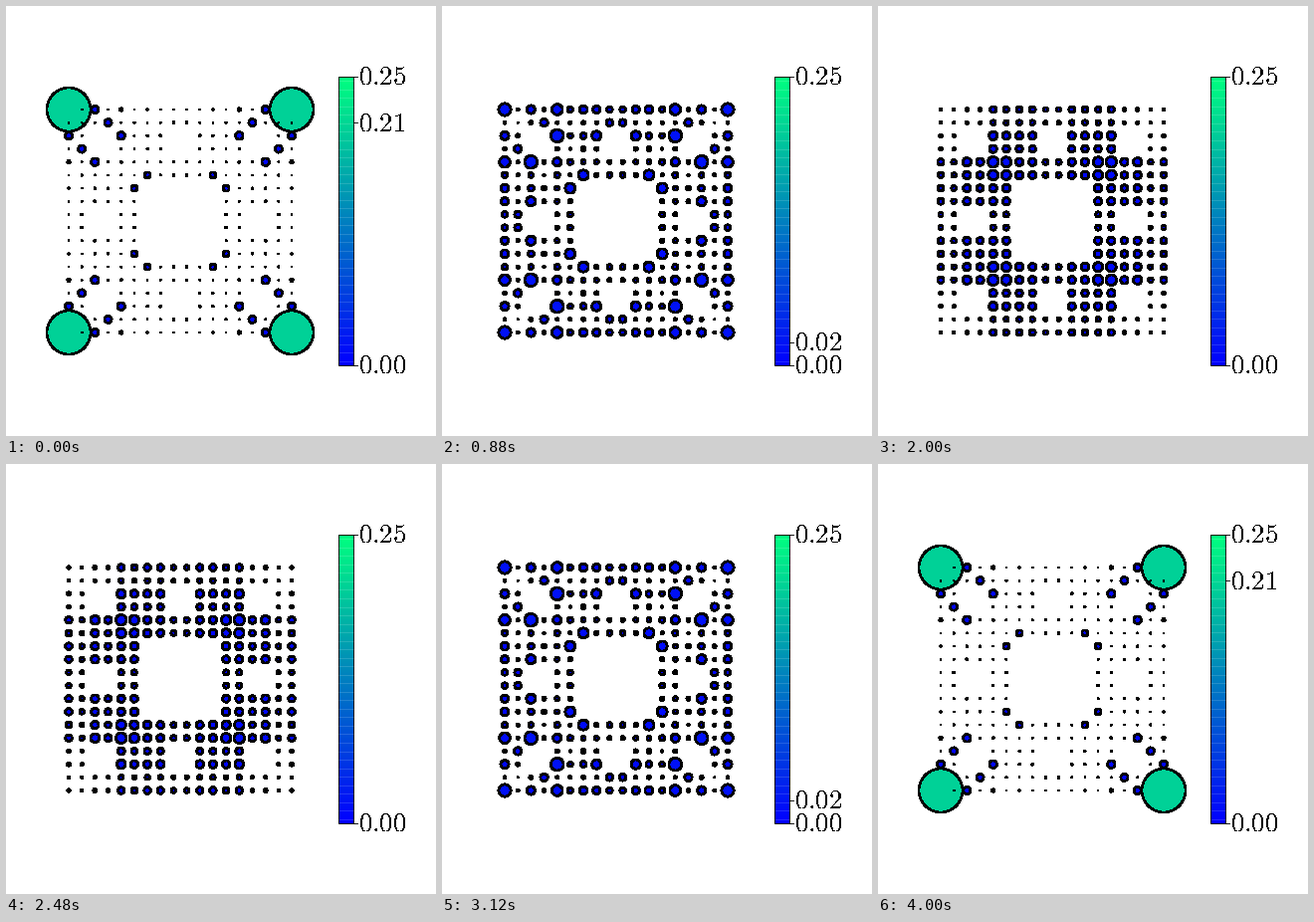
A matplotlib script that plays this animation: 432x432 px, repeating every 4080 ms.

```python
import numpy as np
import matplotlib.pyplot as plt
from matplotlib.animation import FuncAnimation
from matplotlib.patches import Rectangle

plt.rcParams["mathtext.fontset"] = "cm"
plt.rcParams["text.antialiased"] = False

STAGE, DPI = 432, 72
FRAMES, STEP_MS = 51, 80
SITES = 18                      # sites per side: 9 x 9 cells of 2 x 2
V_MAX = 0.25
SWING = 1.8                     # log of the largest hopping ratio
BAR_X, BAR_W, BAR_TOP, BAR_BOTTOM = 334, 15, 71, 361
SEAMS = 34                      # faint light lines across the colour bar


def in_carpet(row, col):
    """True where the second-generation Sierpinski carpet has a site."""
    a, b = row // 2, col // 2
    while a or b:
        if a % 3 == 1 and b % 3 == 1:
            return False
        a, b = a // 3, b // 3
    return True


sites = [(r, c) for r in range(SITES) for c in range(SITES) if in_carpet(r, c)]
index = {site: i for i, site in enumerate(sites)}


def bond_matrices():
    """Bonds inside and between cells, with half a flux quantum per square."""
    inner = np.zeros((len(sites), len(sites)))
    outer = np.zeros_like(inner)
    for (r, c), i in index.items():
        right, down = index.get((r, c + 1)), index.get((r + 1, c))
        if right is not None:
            m = inner if c % 2 == 0 else outer
            m[i, right] = m[right, i] = 1
        if down is not None:
            m = inner if r % 2 == 0 else outer
            m[i, down] = m[down, i] = (-1) ** c
    return inner, outer


inner, outer = bond_matrices()


def density(phase):
    """Mean weight per site of the four states closest to zero energy."""
    half = SWING * np.cos(phase) / 2
    _, states = np.linalg.eigh(np.exp(-half) * inner + np.exp(half) * outer)
    mid = len(sites) // 2
    return np.mean(states[:, mid - 2:mid + 2] ** 2, axis=1)


turn = FRAMES // 2
weights = [density(np.pi * k / turn) for k in range(turn + 1)]

fig = plt.figure(figsize=(STAGE / DPI, STAGE / DPI), dpi=DPI, facecolor="white")
ax = fig.add_axes([0, 0, 1, 1])
ax.axis("off")

rows, cols = np.array(sites).T
pitch = 224 / (SITES - 1)
dots = ax.scatter(63 + pitch * cols, 104 + pitch * rows, c=weights[0],
                  cmap="winter", vmin=0, vmax=V_MAX, edgecolors="black",
                  linewidths=1.7, antialiased=False, zorder=3)

bar_h = BAR_BOTTOM - BAR_TOP
ax.imshow(np.linspace(1, 0, 256)[:, None], cmap="winter", aspect="auto",
          extent=(BAR_X, BAR_X + BAR_W, BAR_BOTTOM, BAR_TOP))
ax.hlines(BAR_TOP + (np.arange(SEAMS) + 0.5) * bar_h / SEAMS,
          BAR_X, BAR_X + BAR_W, color="white", alpha=0.18, lw=0.8)
ax.add_patch(Rectangle((BAR_X, BAR_TOP), BAR_W, bar_h,
                       fill=False, ec="black", lw=0.9))


def bar_y(value):
    return BAR_BOTTOM - bar_h * value / V_MAX


def add_tick(value):
    y = bar_y(value)
    mark, = ax.plot([BAR_X + BAR_W, BAR_X + BAR_W + 3.5], [y, y],
                    color="black", lw=0.9)
    label = ax.text(353.6, y + 0.8, f"${value:.2f}$", fontsize=27,
                    ha="left", va="center")
    return mark, label


add_tick(0)
add_tick(V_MAX)
mark, label = add_tick(0.21)

ax.set_xlim(0, STAGE)
ax.set_ylim(STAGE, 0)


def update(k):
    w = weights[min(k, FRAMES - 1 - k)]
    dots.set_sizes(9400 * w)
    dots.set_array(w)
    corner = round(float(w[0]), 2)
    y = bar_y(corner)
    mark.set_ydata([y, y])
    label.set_y(y + 0.8)
    label.set_text(f"${corner:.2f}$")
    for part in (mark, label):
        part.set_visible(corner > 0)
    return dots, mark, label


def init():
    return update(0)


anim = FuncAnimation(fig, update, frames=FRAMES, init_func=init,
                     interval=STEP_MS, repeat=True, repeat_delay=0)
plt.show()
```
